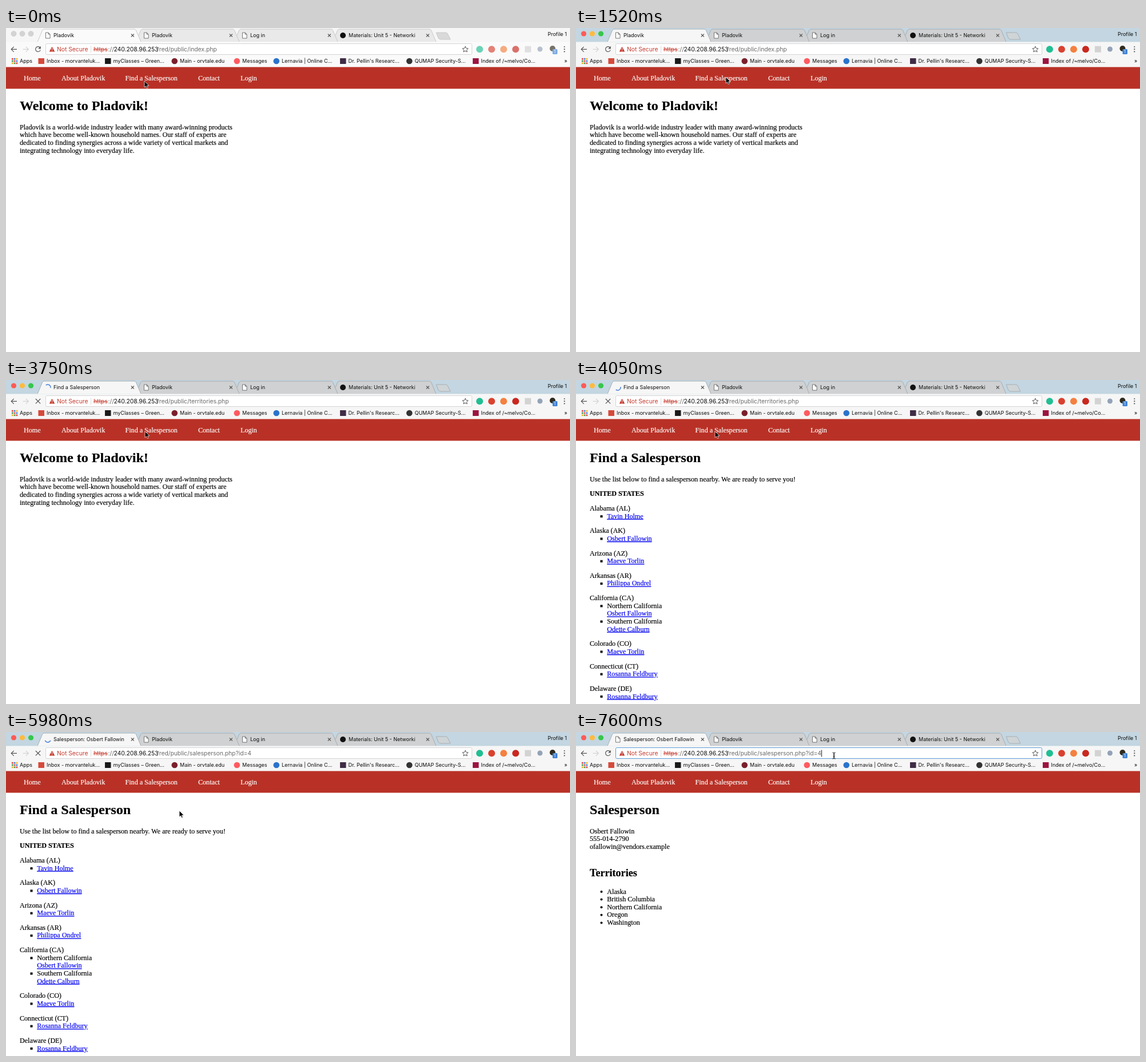
These frames come from a looping animation (986x568 px, 8 s). An HTML page:

```html
<!DOCTYPE html>
<html lang="en">
<head>
<meta charset="utf-8">
<title>Browser session</title>
<style>
html, body { margin: 0; width: 100%; height: 100%; overflow: hidden; background: #fff; }
svg { display: block; width: 100%; height: 100%;
  --strip: #f6f6f6; --tab: #e9e9e9; --edge: #c4c4c4; --bar: #fafafa; --plus: #d9d9d9; --fade: .65; }
svg.on { --strip: #c3d6e1; --tab: #d0d1d2; --edge: #a3aaae; --bar: #f6f6f6; --plus: #cfd4d7; --fade: 1; }
text { white-space: pre; }
.ui { font: 9px Inter, Roboto, sans-serif; fill: #0c0c0c; }
.url { font-size: 10.3px; }
.page { font: 12.1px "Liberation Serif", "Times New Roman", serif; }
.page text { stroke: #000; stroke-width: .18; }
.page #nav text { fill: #fff; stroke: #fff; }
.page .link { fill: #00e; stroke: #00e; text-decoration: underline; }
.h1 { font-size: 24.1px; font-weight: bold; }
.h2 { font-size: 18.1px; font-weight: bold; }
.line { fill: none; stroke: #555; stroke-width: 1.2; }
.tab { fill: var(--tab); stroke: var(--edge); stroke-width: .9; }
.tab.front { fill: var(--bar); }
.faded { fill: url(#fadeOut); }
#lights circle { fill: #d3d3d3; stroke: #c2c2c2; stroke-width: .5; }
.on #lights circle { fill: var(--c); stroke: none; }
#extensions { opacity: var(--fade); }
</style>
</head>
<body>
<svg id="stage" viewBox="0 0 986 568" preserveAspectRatio="none">
  <defs>
    <linearGradient id="fadeOut" gradientUnits="userSpaceOnUse" x1="712" x2="731">
      <stop stop-color="#0c0c0c"/><stop offset="1" stop-color="#0c0c0c" stop-opacity="0"/>
    </linearGradient>
  </defs>
  <rect width="986" height="568" fill="#fff"/>
  <g class="ui">
    <rect width="986" height="25" fill="var(--strip)"/>
    <g id="lights"></g>
    <path d="M752 8H769Q771 8 772 10L777 20H760Q757 20 756 18Z" fill="var(--plus)" stroke="var(--edge)" stroke-width=".9"/>
    <g id="tabs"></g>
    <circle id="spinner" cx="73" cy="13" r="5" fill="none" stroke-width="1.6" pathLength="360"/>
    <text x="980.5" y="13.8" text-anchor="end">Profile 1</text>

    <rect y="24.4" width="986" height="44.6" fill="var(--bar)"/>
    <path class="line" d="M19 37.3H9.5M13.7 32.8L9.2 37.3L13.7 41.8"/>
    <path class="line" style="stroke:#d2d2d2" d="M29.5 37.3H39M34.8 32.8L39.3 37.3L34.8 41.8"/>
    <g id="reload">
      <path class="line" d="M59.2 34A4.4 4.4 0 1 0 60.2 38.6"/>
      <path d="M60.8 31.8V36.4H56.2Z" fill="#555"/>
    </g>
    <path id="stop" class="line" d="M51.8 33L60.2 41.4M60.2 33L51.8 41.4"/>
    <rect id="field" x="69.5" y="27.5" width="745" height="19" rx="2" fill="#fff" stroke-width="1"/>
    <g class="url">
      <path d="M80.5 32.8L85.3 41.5H75.7Z" fill="#c53a2d"/>
      <path d="M80.5 35.6V38.4M80.5 39.3V40.4" stroke="#fff"/>
      <text x="89" y="41.2" fill="#c53a2d">Not Secure</text>
      <path d="M148.5 31V43.5" stroke="#dcdcdc"/>
      <rect id="selection" x="153" y="30.5" height="13.5" fill="#b4d5fe"/>
      <text x="153" y="41.2" fill="#c53a2d" text-decoration="line-through">https</text>
      <text x="178.5" y="41.2" fill="#666">://</text>
      <text x="188.5" y="41.2">240.208.96.253</text>
      <text id="path" x="264" y="41.2" fill="#6a6a6a"></text>
      <path id="caret" d="M.5 31.5V43.5" stroke="#000" stroke-width=".9"/>
    </g>
    <path class="line" style="stroke-width:1" stroke-linejoin="round"
      d="M803 32.2L804.5 35.6L808.1 36L805.4 38.4L806.2 42L803 40.2L799.8 42L800.6 38.4L797.9 36L801.5 35.6Z"/>
    <g id="extensions"></g>
    <g fill="#555"><circle cx="976.3" cy="33" r="1.1"/><circle cx="976.3" cy="37.2" r="1.1"/><circle cx="976.3" cy="41.4" r="1.1"/></g>
    <g id="bookmarks"></g>
    <text x="976" y="61">»</text>
  </g>
  <g class="page">
    <rect y="68.5" width="986" height="38" fill="#b93126"/>
    <g id="nav"></g>
    <g id="pages"></g>
  </g>
  <path id="arrow" d="M0 0V11L2.6 8.7L4.3 12.6L6.1 11.8L4.5 8H8Z" stroke="#fff" stroke-width=".7"/>
  <path id="beam" d="M-2.5 -5.5Q0 -5.5 0 -4V4Q0 5.5 -2.5 5.5M2.5 -5.5Q0 -5.5 0 -4V4Q0 5.5 2.5 5.5M-1.2 1.5H1.2" fill="none" stroke="#111"/>
</svg>
<script>
const $ = id => document.getElementById(id);
const text = (x, y, s, attrs = '') => `<text x="${x}" y="${y}" ${attrs}>${s}</text>`;
const dot = (x, y, r, c) => `<circle cx="${x}" cy="${y}" r="${r}" fill="${c}"/>`;
const box = (x, y, w, h, c) => `<rect x="${x - w / 2}" y="${y - h / 2}" width="${w}" height="${h}" fill="${c}"/>`;
const show = (id, on) => $(id).style.display = on ? '' : 'none';

const BRAND = 'Pladovik', SELLER = 'Osbert Fallowin';
const LINE = 13.62, GAP = 12.05;

// Window chrome
$('lights').innerHTML = ['#fc5b57', '#fdbc40', '#34c84a']
  .map((c, i) => `<circle cx="${13.5 + 15 * i}" cy="10" r="4.6" style="--c:${c}"/>`).join('');

const docIcon = '<path d="M69.4 8H74L77 11V18H69.4ZM74 8V11H77" fill="#fff" stroke="#666" stroke-width=".9"/>';
const tab = (title, i) => `<g transform="translate(${172 * i})">
  <path class="tab ${i ? '' : 'front'}" d="M55 24.5L63.6 4Q64.6 2 67 2H224Q226.4 2 227.4 4L236 24.5"/>
  <g ${i ? '' : 'id="favicon"'}>${i == 3 ? dot(73, 13, 5, '#111') : docIcon}</g>
  <path class="line" style="stroke-width:1.1" d="M218.8 10.5L223.8 15.5M223.8 10.5L218.8 15.5"/></g>`
  + text(83 + 172 * i, 16.2, title, i == 3 ? 'class="faded"' : i ? '' : 'id="title"');
$('tabs').innerHTML = ['', BRAND, 'Log in', 'Materials: Unit 5 - Networki'].map(tab).reverse().join('');

$('extensions').innerHTML =
  ['#1fbf92', '#d9412f', '#f4813f', '#c9281f'].map((c, i) => dot(828 + 21 * i, 37.2, 6, c)).join('')
  + box(912.5, 37.2, 11, 11, '#d3d3d3') + dot(933.5, 37, 4.5, '#93a2b7') + dot(955.5, 36, 5, '#2f2a1c')
  + `<rect x="955.5" y="37" width="8.5" height="9" rx="1.5" fill="#3f82d8"/>`
  + text(958, 44.2, 1, 'style="font-size:7px;fill:#fff"');

const appColors = ['#e2483d', '#4a9e53', '#f0b429', '#3f7fe0'];
const bookmarks = [
  [71, box, '#d64a3b', 'Inbox - morvanteluk...'], [187.5, box, '#1a1a1a', 'myClasses – Green...'],
  [304, dot, '#7a1f2b', 'Main - orvtale.edu'], [413, dot, '#ff5a60', 'Messages'],
  [482, dot, '#2a73cc', 'Lernavia | Online C...'], [598.5, box, '#3f2c45', "Dr. Pellin's Researc..."],
  [714.5, dot, '#333', 'QUMAP Security-S...'], [830.5, box, '#9c1440', 'Index of /~melvo/Co...']];
$('bookmarks').innerHTML = text(24, 61.2, 'Apps')
  + [...Array(9).keys()].map(i => box(11.3 + 3.8 * (i % 3), 54.2 + 3.8 * (i / 3 | 0), 2.7, 2.7, appColors[i * 3 % 4])).join('')
  + bookmarks.map(([x, shape, c, s]) =>
      (shape == dot ? dot(x - 9.3, 58, 5.3, c) : box(x - 9.3, 58, 10.5, 10, c)) + text(x, 61.2, s)).join('');

// Page content
$('nav').innerHTML = [[31, 'Home'], [97, 'About ' + BRAND], [208.5, 'Find a Salesperson'], [336, 'Contact'], [410, 'Login']]
  .map(([x, s]) => text(x, 92.2, s)).join('');

const heading = s => text(24, 143.8, s, 'class="h1"');
const lines = (x, y, list) => list.map((s, i) => text(x, y + LINE * i, s)).join('');

const home = heading(`Welcome to ${BRAND}!`) + lines(24, 177.8, [
  BRAND + ' is a world-wide industry leader with many award-winning products',
  'which have become well-known household names. Our staff of experts are',
  'dedicated to finding synergies across a wide variety of vertical markets and',
  'integrating technology into everyday life.']);

// Entries starting with "-" are districts; plain strings are linked people
const states = [
  ['Alabama (AL)', 'Tavin Holme'], ['Alaska (AK)', SELLER], ['Arizona (AZ)', 'Maeve Torlin'],
  ['Arkansas (AR)', 'Philippa Ondrel'],
  ['California (CA)', '-Northern California', SELLER, '-Southern California', 'Odette Calburn'],
  ['Colorado (CO)', 'Maeve Torlin'], ['Connecticut (CT)', 'Rosanna Feldbury'], ['Delaware (DE)', 'Rosanna Feldbury']];

function stateList() {
  let y = 229, out = '';
  for (const [state, ...items] of states) {
    out += text(24, y, state);
    items.forEach((s, i) => {
      y += LINE;
      const district = s[0] == '-';
      if (district || !i) out += box(44.5, y - 3.5, 4, 4, '#000');
      out += district ? text(54.3, y, s.slice(1)) : text(54.3, y, s, 'class="link"');
    });
    y += LINE + GAP;
  }
  return out;
}
const finder = heading('Find a Salesperson')
  + text(24, 177.8, 'Use the list below to find a salesperson nearby. We are ready to serve you!')
  + text(24, 203.3, 'UNITED STATES', 'font-weight="bold"') + stateList();

const areas = ['Alaska', 'British Columbia', 'Northern California', 'Oregon', 'Washington'];
const person = heading('Salesperson')
  + lines(24, 177.8, [SELLER, '555-014-2790', 'ofallowin@vendors.example'])
  + text(24, 253, 'Territories', 'class="h2"') + lines(54.3, 283.5, areas)
  + areas.map((_, i) => dot(44.5, 280 + LINE * i, 2, '#000')).join('');

$('pages').innerHTML = [home, finder, person].map((p, i) => `<g id="page${i}">${p}</g>`).join('');

// Timeline (ms)
const STEP = 149;
const loads = [
  { start: 2560, commit: 3600, paint: 3900, end: 4190, angle: -190 },
  { start: 5380, commit: 5830, paint: 6130, end: 6420, angle: -40 }];
const sites = [
  [BRAND, 'index.php'], ['Find a Salesperson', 'territories.php'],
  ['Salesperson: ' + SELLER, 'salesperson.php?id=4']];
const pointer = [
  [0, 242, 93], [140, 238, 89], [320, 236, 87], [920, 245, 87], [1070, 256, 86], [1220, 262, 86],
  [1970, 254, 87], [2120, 240, 89], [2270, 243, 90],
  [4490, 225, 118], [4640, 165, 190], [4790, 112, 248], [4940, 94, 267], [5090, 93, 278], [5240, 92, 287],
  [5680, 150, 240], [5830, 245, 172], [5980, 303, 138], [6130, 345, 122], [6270, 385, 110],
  [6420, 425, 104], [6570, 440, 80], [6720, 449, 52], [6860, 451, 41.5]];
const ACTIVATE = 1370, BEAM = 6860, FOCUS = 7010, SELECT = 7160, DESELECT = 7600;

let shownSite;
function draw(t) {
  const passed = key => loads.filter(l => t >= l[key]).length;
  $('stage').classList.toggle('on', t >= ACTIVATE);

  const site = passed('commit'), page = passed('paint');
  if (site != shownSite) {
    shownSite = site;
    $('title').textContent = sites[site][0];
    $('path').textContent = '/red/public/' + sites[site][1];
  }
  for (let i = 0; i < 3; i++) show('page' + i, i == page);

  const load = loads.find(l => t >= l.start && t < l.end);
  show('reload', !load);
  show('stop', load);
  show('favicon', !load);
  show('spinner', load);
  if (load) {
    const busy = t >= load.commit;
    const n = Math.floor((t - (busy ? load.commit : load.start)) / STEP);
    const angle = busy ? load.angle + 60 * n : -95 - 55 * n;
    const spin = $('spinner');
    spin.setAttribute('stroke', busy ? '#4a80dc' : '#a5b2c8');
    spin.setAttribute('stroke-dasharray', busy ? '140 220' : '100 260');
    spin.setAttribute('transform', `rotate(${angle} 73 13)`);
  }

  const urlEnd = 264 + $('path').getComputedTextLength();
  $('field').setAttribute('stroke', t >= FOCUS ? '#5b9bd8' : '#d4d4d4');
  show('selection', t >= SELECT && t < DESELECT);
  $('selection').setAttribute('width', urlEnd - 153);
  show('caret', t >= DESELECT);
  $('caret').setAttribute('transform', `translate(${urlEnd})`);

  const [, x, y] = pointer.filter(p => t >= p[0]).pop();
  show('arrow', t < BEAM);
  show('beam', t >= BEAM);
  for (const id of ['arrow', 'beam']) $(id).setAttribute('transform', `translate(${x} ${y})`);
}

const begin = performance.now();
(function tick() {
  draw((performance.now() - begin) % 8000);
  requestAnimationFrame(tick);
})();
</script>
</body>
</html>
```
